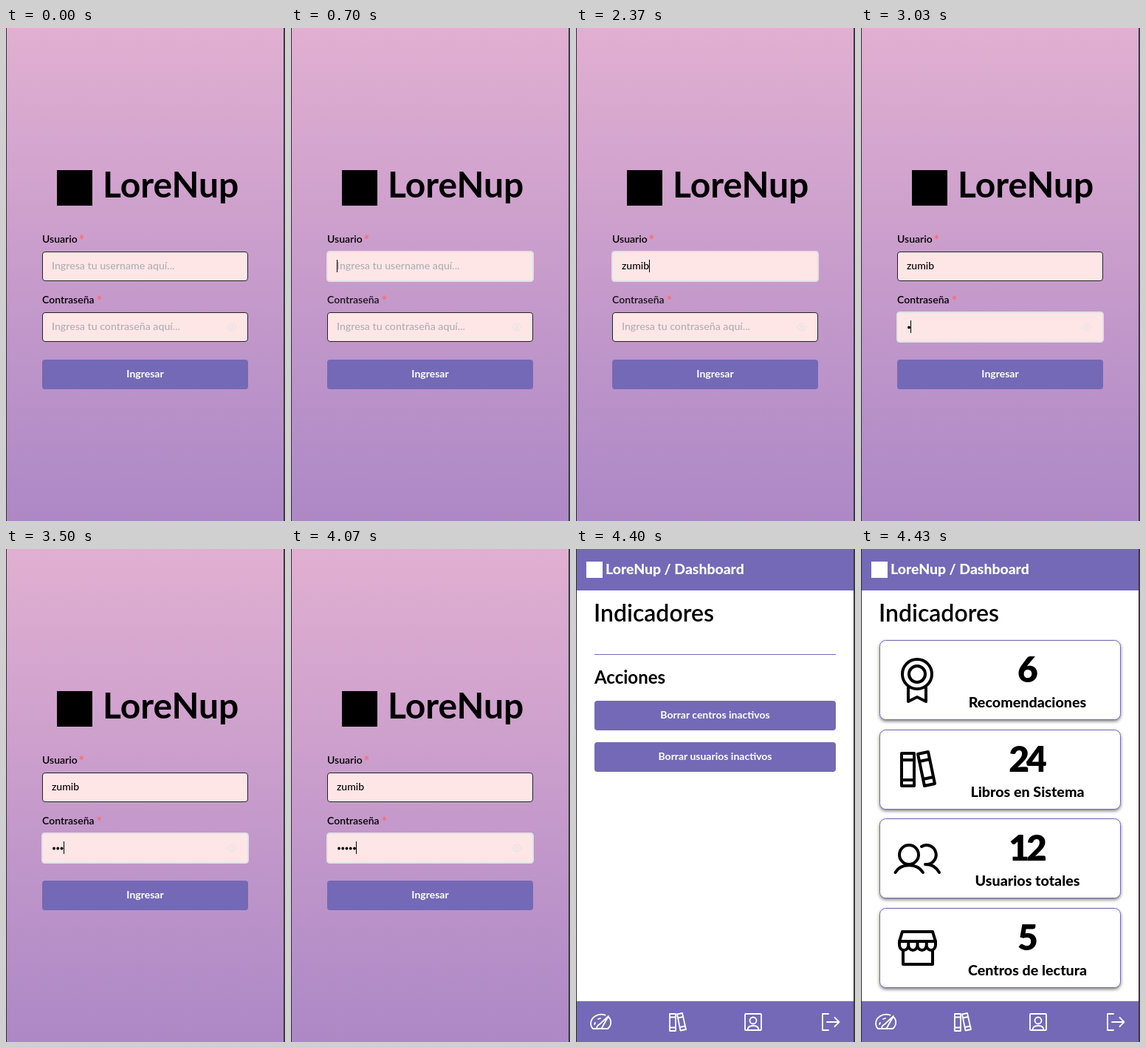
Recreate the animation shown at these times as an HTML page. Size 378x666 px, loop 6.9 s.

```html
<!DOCTYPE html>
<html lang="es">
<head>
<meta charset="utf-8">
<title>LoreNup</title>
<style>
html, body { margin: 0; width: 100%; height: 100%; overflow: hidden; background: #fff; }
svg { display: block; width: 378px; height: 666px; }
text { font: 500 14px Lato, "Open Sans", sans-serif; fill: #000; }
.btn { font-weight: 700; fill: #fff; text-anchor: middle; }
.label { font-weight: 600; }
.hint { font-size: 14.2px; fill: #adafb7; }
.star { font-size: 18px; font-weight: 700; fill: #ff6b6b; }
.brand { font-size: 48px; font-weight: 700; }
.bar { font-size: 19.4px; font-weight: 800; fill: #fff; }
.h1 { font-size: 32px; font-weight: 600; }
.h2 { font-size: 24px; font-weight: 700; }
.num { font-size: 48px; font-weight: 900; letter-spacing: -4px; text-anchor: middle; }
.cap { font-size: 19.7px; font-weight: 800; text-anchor: middle; }
.purple { fill: #7469b6; }
.field { fill: #ffe6e6; stroke: #222; stroke-width: 1; }
.field.on { stroke: #dee2e6; stroke-width: 2; }
.card { fill: #fff; stroke: #7469b6; filter: drop-shadow(0 2px 2px rgba(0, 0, 0, .5)); }
.icon { fill: none; stroke: #000; stroke-width: 4; stroke-linejoin: round; stroke-linecap: round; }
.small { fill: none; stroke: #fff; stroke-width: 1.8; stroke-linejoin: round; stroke-linecap: round; }
</style>
</head>
<body>
<svg viewBox="0 0 378 666">
  <defs>
    <linearGradient id="sky" x1="0" y1="0" x2="0" y2="1">
      <stop offset="0" stop-color="#e1afd1"/>
      <stop offset="1" stop-color="#ad88c6"/>
    </linearGradient>
  </defs>

  <g id="login">
    <rect width="378" height="666" fill="url(#sky)"/>
    <rect x="69" y="192" width="48" height="48"/>
    <text class="brand" x="131" y="229">LoreNup</text>

    <text class="label" x="49" y="290">Usuario</text>
    <text class="star" x="98.5" y="293">*</text>
    <rect class="field" id="userBox" rx="3.5"/>
    <text class="hint" id="userHint" x="62" y="326">Ingresa tu username aquí...</text>
    <text id="user" x="62" y="326"></text>

    <text class="label" id="passLabel" x="49" y="372">Contraseña</text>
    <text class="star" x="122.5" y="375">*</text>
    <rect class="field" id="passBox" rx="3.5"/>
    <text class="hint" id="passHint" x="62" y="408">Ingresa tu contraseña aquí...</text>
    <g id="dots"></g>
    <g fill="none" stroke="#dee2e6">
      <path d="M299.5 404q6.5-10 13 0q-6.5 10-13 0z"/>
      <circle cx="306" cy="404" r="1.8"/>
    </g>
    <rect id="caret" width="1" height="17"/>

    <rect class="purple" x="49" y="448" width="279" height="40" rx="4"/>
    <text class="btn" x="188.5" y="472">Ingresar</text>
  </g>

  <g id="dash">
    <rect width="378" height="666" fill="#fff"/>
    <rect class="purple" width="378" height="56"/>
    <text class="bar" id="crumb" y="34">LoreNup / Dashboard</text>
    <text class="h1" x="24" y="98">Indicadores</text>

    <g id="actions">
      <rect class="purple" x="25" y="142" width="327" height="1"/>
      <text class="h2" x="25" y="182">Acciones</text>
      <rect class="purple" x="25" y="205" width="327" height="40" rx="4"/>
      <text class="btn" x="188.5" y="229">Borrar centros inactivos</text>
      <rect class="purple" x="25" y="261" width="327" height="40" rx="4"/>
      <text class="btn" x="188.5" y="285">Borrar usuarios inactivos</text>
    </g>

    <g id="cards">
      <g id="panels"></g>
      <g class="icon">
        <circle cx="76" cy="169" r="20"/>
        <circle cx="76" cy="169" r="11"/>
        <path d="M64 187v19l12-6l12 6v-19"/>

        <path d="M55 276h17v44h-17zM55 285h17M55 312h17"/>
        <path d="M77 277l14-3l9 43l-14 3zM79 287l14-3M84 311l14-3"/>

        <circle cx="65" cy="413" r="13"/>
        <path d="M46.5 437C54 424 76 424 84 437"/>
        <path d="M82 402A13 13 0 1 1 87 426Q99 425 106 437"/>

        <path d="M56 517h41l4 13H52z"/>
        <path d="M52 530v5a6.125 7 0 0 0 12.25 0v-5m0 5a6.125 7 0 0 0 12.25 0v-5
                 m0 5a6.125 7 0 0 0 12.25 0v-5m0 5a6.125 7 0 0 0 12.25 0v-5"/>
        <path d="M57 542v19h40v-19"/>
      </g>
    </g>

    <rect y="610" width="378" height="1" fill="#e3e2ea"/>
    <rect class="purple" y="611" width="378" height="55"/>
    <g id="barIcons">
      <rect x="14" y="17" width="22" height="22" fill="#fff"/>
      <g class="small">
        <path d="M23 648h20C49 643 48 635 43.5 632M39.5 629.7C30 626 19.5 633 20 642q.5 4 3 6"/>
        <path d="M28 648q0-4 4-6l12-11l-8 14q-1 3-3 3M25 642l1-2M30 635l3-1"/>

        <path d="M127 628h8v23h-8zM127 632.5h8M127 646.5h8"/>
        <path d="M137 628.5l7-1.5l5 22l-7.5 1.5zM138 633.5l7-1.5M141 646l7-1.5"/>

        <rect x="229" y="628" width="22" height="22" rx="1"/>
        <circle cx="240" cy="637" r="4.5"/>
        <path d="M232.5 650q0-6 7.5-6t7.5 6"/>

        <path d="M342 628h-8v22h8M340 639h16M350.5 633l6 6l-6 6"/>
      </g>
    </g>
  </g>

  <rect width="1" height="666" fill="#2e2e32"/>
  <rect x="376" width="2" height="666" fill="#3a3a3f"/>
</svg>

<script>
const LOOP = 6900;
const USER = "zumib";
const USER_KEYS = [1570, 1800, 2000, 2230, 2370];
const PASS_KEYS = [3030, 3230, 3500, 3730, 4070];
const USER_FOCUS = 700, PASS_FOCUS = 2630, OPEN = 4370, ICONS = 4400, LOADED = 4430;
const BLINK = 500, DOT_STEP = 5.25;
const STATS = [
  ["6", "Recomendaciones"],
  ["24", "Libros en Sistema"],
  ["12", "Usuarios totales"],
  ["5", "Centros de lectura"]
];

const el = id => document.getElementById(id);
const set = (node, attrs) => {
  for (const key in attrs) node.setAttribute(key, attrs[key]);
  return node;
};
const toggle = (node, on) => set(node, { visibility: on ? "inherit" : "hidden" });
const show = (id, on) => toggle(el(id), on);

function add(parent, tag, attrs, label = "") {
  const node = document.createElementNS("http://www.w3.org/2000/svg", tag);
  node.textContent = label;
  return parent.appendChild(set(node, attrs));
}

STATS.forEach(([value, name], i) => {
  const top = 123.5 + Math.round(120.6 * i);
  const panels = el("panels");
  add(panels, "rect", { class: "card", x: 25.5, y: top, width: 326, height: 107, rx: 8 });
  add(panels, "text", { class: "num", x: 224, y: top + 56 }, value);
  add(panels, "text", { class: "cap", x: 225.5, y: top + 90.5 }, name);
});

const dots = PASS_KEYS.map((_, i) =>
  add(el("dots"), "circle", { cx: 65 + DOT_STEP * i, cy: 404.5, r: 1.9 }));

function drawField(id, y, focused) {
  const inset = focused ? 0 : 0.5;
  set(el(id), {
    class: focused ? "field on" : "field",
    x: 49 + inset, y: y + inset, width: 279 - 2 * inset, height: 40 - 2 * inset
  });
}

function drawLogin(t) {
  const typed = USER_KEYS.filter(k => k <= t);
  const hidden = PASS_KEYS.filter(k => k <= t);
  const onPass = t >= PASS_FOCUS;
  const onUser = t >= USER_FOCUS && !onPass;

  drawField("userBox", 302, onUser);
  drawField("passBox", 384, onPass);
  set(el("passLabel"), { "fill-opacity": onUser ? 0.88 : 1 });

  const user = el("user");
  user.textContent = USER.slice(0, typed.length);
  show("userHint", !typed.length);
  show("passHint", !hidden.length);
  dots.forEach((dot, i) => toggle(dot, i < hidden.length));

  const keys = onPass ? [PASS_FOCUS, ...hidden] : [USER_FOCUS, ...typed];
  const sinceKey = t - keys[keys.length - 1];
  const lit = Math.floor(sinceKey / BLINK) % 2 === 0;
  const shift = onPass ? DOT_STEP * hidden.length : user.getComputedTextLength();
  set(el("caret"), { x: Math.round(62 + shift), y: onPass ? 395 : 313 });
  show("caret", (onUser || onPass) && lit);
}

function drawDash(t) {
  show("actions", t < LOADED);
  show("cards", t >= LOADED);
  show("barIcons", t >= ICONS);
  set(el("crumb"), { x: t >= ICONS ? 40 : 8 });
}

function draw(t) {
  const open = t >= OPEN;
  show("login", !open);
  show("dash", open);
  if (open) drawDash(t);
  else drawLogin(t);
}

const start = performance.now();
function tick() {
  draw((performance.now() - start) % LOOP);
  requestAnimationFrame(tick);
}
tick();
</script>
</body>
</html>
```
